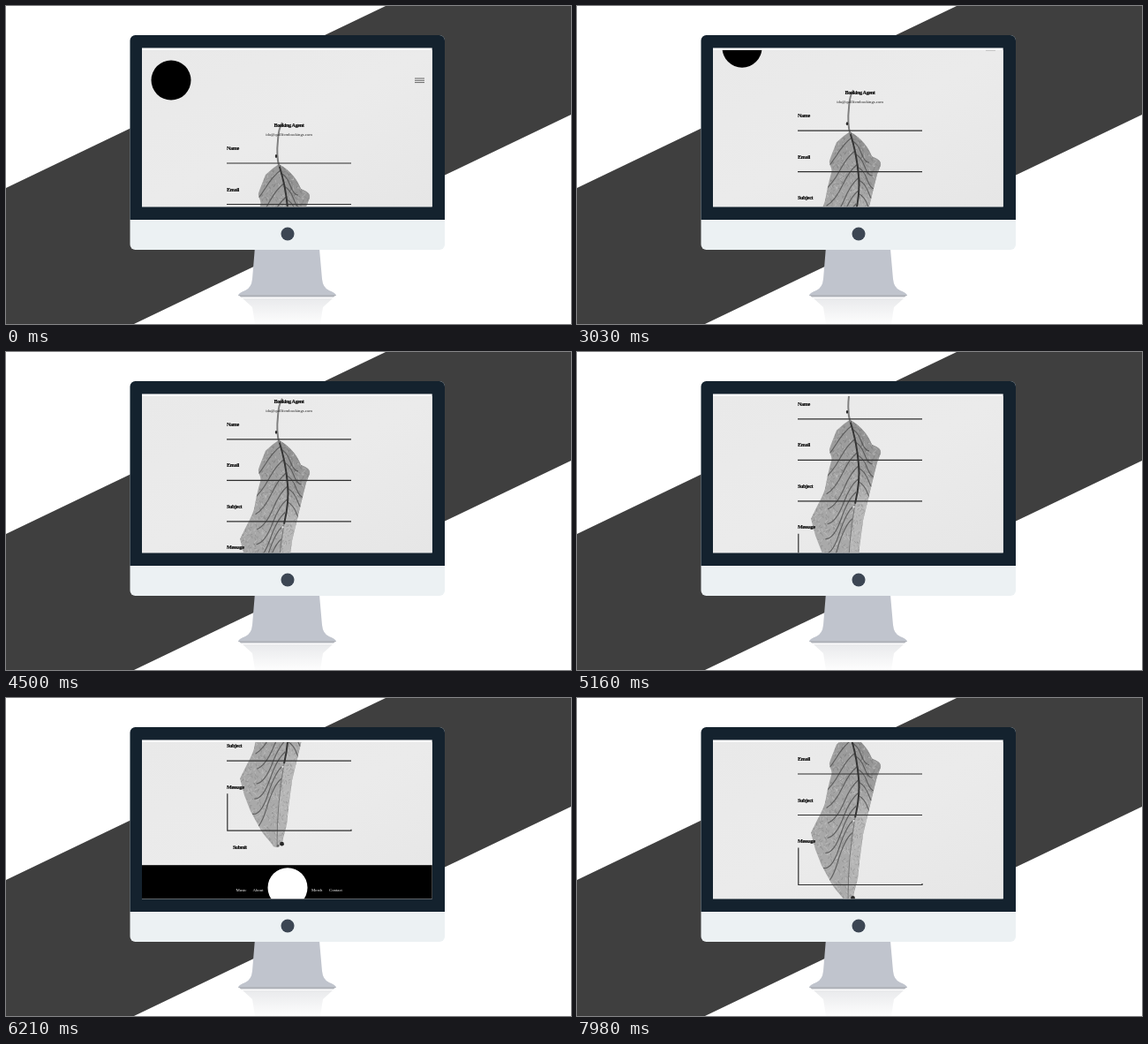
An HTML page that plays this animation: 640 px wide and 360 px high, repeating every 8 s.

```html
<!DOCTYPE html>
<html lang="en">
<head>
<meta charset="utf-8">
<title>Booking form on a desktop screen</title>
<style>
  html, body { margin: 0; width: 100%; height: 100%; overflow: hidden; background: #fff; }
  svg { display: block; width: 100vw; height: 100vh; }
  .label { font: bold 6.2px "Liberation Serif", serif; letter-spacing: -.4px; fill: #080808; stroke: #080808; stroke-width: .15; }
  .mail { font: 4.7px "Liberation Serif", serif; fill: #222; }
  .menu { font: 4.8px "Liberation Serif", serif; fill: #fff; }
  .mid { text-anchor: middle; }
  .rule { fill: none; stroke: #2f2f2f; stroke-width: 1.2; }
</style>
</head>
<body>
<svg viewBox="0 0 640 360" preserveAspectRatio="none">
  <defs>
    <clipPath id="view"><rect x="154" y="50" width="328.7" height="177.3"/></clipPath>
    <clipPath id="leafClip"><use href="#leafShape"/></clipPath>
    <linearGradient id="paper" x2="1" y2="1">
      <stop stop-color="#e9e9e9"/><stop offset=".5" stop-color="#ebebeb"/><stop offset="1" stop-color="#e6e6e6"/>
    </linearGradient>
    <linearGradient id="leafTone" x2="0" y2="1">
      <stop stop-color="#999"/><stop offset=".45" stop-color="#a6a6a6"/><stop offset="1" stop-color="#acacac"/>
    </linearGradient>
    <linearGradient id="halfTone" x2="0" y2="1">
      <stop stop-color="#8e8e8e"/><stop offset=".3" stop-color="#9c9c9c"/>
      <stop offset=".5" stop-color="#b9b9b9"/><stop offset="1" stop-color="#b2b2b2"/>
    </linearGradient>
    <linearGradient id="mirror" x2="0" y2="1">
      <stop stop-color="#e9eaec"/><stop offset="1" stop-color="#fdfdfd"/>
    </linearGradient>
  </defs>

  <rect width="640" height="360" fill="#fff"/>
  <path d="M0 206L430 0H640V123L145 360H0Z" fill="#3f3f3f"/>

  <path d="M268 331H370L359 341L356 360H282L279 341Z" fill="url(#mirror)"/>
  <path d="M281.800 275H355L358 309Q359 319 366 322Q374 325 374 328H263Q263 325 271 322Q278 319 279 309Z" fill="#c0c4cd"/>
  <path d="M263 327H374L371 329.5H266Z" fill="#b1b4bb"/>
  <rect x="140.5" y="33" width="356.5" height="243" rx="6" fill="#ecf1f3"/>
  <path d="M140.5 242V39a6 6 0 0 1 6-6H491a6 6 0 0 1 6 6V242Z" fill="#14222e"/>
  <circle cx="319" cy="258" r="7.5" fill="#3c4653"/>
  <rect x="154" y="47.5" width="328.7" height="179.8" fill="#fbfbfb"/>

  <g clip-path="url(#view)">
    <rect x="154" y="50" width="329" height="178" fill="url(#paper)"/>
    <g id="page">
      <path id="leafShape" fill="url(#leafTone)" d="M309 179L302 184L294 191C291 199 288 205 286 212
        C285 217 290 220 288 226C285 236 283 246 281 257C278 267 272 276 269 283L265 291L270 310L277 328L288 348
        C293 357 299 361 303 368L307 369L313 363L314 358L318 343L320 323L324 293L330 268L336 243L340 227
        L344 217C345 211 338 209 334 207C330 197 323 187 309 179Z"/>
      <g clip-path="url(#leafClip)" fill="none">
        <path fill="url(#halfTone)" d="M309 179Q317 204 319 229Q321 250 314 279Q307 318 307 369L350 369V179Z"/>
        <path id="dark" stroke="#555" stroke-width=".6" opacity=".4"/>
        <path id="pale" stroke="#ddd" stroke-width=".7" opacity=".45"/>
        <path id="veins" stroke="#4a4a4a" stroke-width="1.2" opacity=".75"/>
        <path stroke="#353535" stroke-width="2" d="M309 179Q317 204 319 229Q321 248 315 274"/>
        <path stroke="#777" stroke-width="1" d="M315 274Q307 318 307 366"/>
        <circle cx="313.5" cy="277.5" r="1.2" fill="#ddd"/>
      </g>
      <path d="M313 132Q308.500 139 308 152Q306 170 309.500 182" fill="none" stroke="#808080" stroke-width="2"/>
      <ellipse cx="306" cy="170" rx="1.2" ry="1.9" fill="#2b2b2b"/>
      <circle cx="312.500" cy="365" r="2.4" fill="#282828"/>
      <circle cx="308" cy="367" r="1.500" fill="#666"/>

      <circle cx="187" cy="84" r="22.5"/>
      <path d="M463 82h11m-11 2.300h11m-11 2.300h11" stroke="#444" stroke-width=".8"/>

      <text class="label mid" x="320.500" y="137.300">Booking Agent</text>
      <text class="mail mid" x="320.500" y="147.300">ida@quillfernbookings.com</text>
      <g id="fields"></g>
      <path class="rule" d="M250.800 308V350H391v-1.500"/>
      <text class="label" x="257" y="370.800" style="font-size:5.800px">Submit</text>

      <rect x="154" y="389" width="330" height="80"/>
      <circle cx="319" cy="414.500" r="22.500" fill="#fff"/>
      <g id="menu" class="menu"></g>
    </g>
  </g>
</svg>
<script>
const LOOP = 8000;
const $ = id => document.getElementById(id);

const text = (cls, x, y, str) => `<text class="${cls}" x="${x}" y="${y}">${str}</text>`;

$('fields').innerHTML = ['Name', 'Email', 'Subject', 'Message'].map((name, i) => {
  const y = 178 + i * 46.5;
  const rule = i < 3 ? `<path class="rule" d="M250 ${y}H391"/>` : '';
  return text('label', 250, y - 15, name) + rule;
}).join('');

$('menu').innerHTML = [['Music', 260.5], ['About', 279.5], ['Merch', 346], ['Contact', 366]]
  .map(([name, x]) => text('menu', x, 418.8, name)).join('');

// Leaf veins fan out from the midrib
const ribX = y => y < 240 ? 309 + 10.5 * Math.sin((y - 179) / 61 * Math.PI / 2)
                          : 319.5 - 12.5 * Math.sin((y - 240) / 125 * Math.PI / 2);
let veins = '';
for (let i = 0; i < 8; i++) {
  const y = 186 + i * 15, x = ribX(y);
  veins += `M${x} ${y}q-9 7 -17 ${20 + i * 2}t-18 23`;
  if (i < 5) veins += `M${x} ${y + 3}q7 3 11 14t9 11`;
}
$('veins').setAttribute('d', veins);

let seed = 7;
const rand = () => (seed = seed * 16807 % 2147483647) / 2147483647;
const flecks = count => Array.from({ length: count }, () =>
  `M${264 + rand() * 80} ${180 + rand() * 185}l${rand() * 6 - 3} ${rand() * 4}`).join('');
$('dark').setAttribute('d', flecks(800));
$('pale').setAttribute('d', flecks(700));

const smooth = p => p * p * (3 - 2 * p);
const square = p => p * p;
const linear = p => p;

// start, end, scroll at end, easing
const moves = [
  [1620, 1980, 10.5, smooth],
  [2370, 2760, 32, smooth],
  [2940, 3150, 44, smooth],
  [3480, 3720, 53, smooth],
  [4020, 4830, 94, smooth],
  [5010, 5820, 184, smooth],
  [5820, 6540, 212, smooth],
  [7170, 7410, 198.7, square],
  [7410, 7980, 138.5, linear]
];

function scrollAt(t) {
  let pos = 0;
  for (const [start, end, to, ease] of moves) {
    if (t <= start) break;
    pos += (to - pos) * ease(Math.min(1, (t - start) / (end - start)));
  }
  return pos;
}

function draw(now) {
  $('page').setAttribute('transform', `translate(0 ${-scrollAt(now % LOOP).toFixed(2)})`);
  requestAnimationFrame(draw);
}
draw(performance.now());
</script>
</body>
</html>
```
